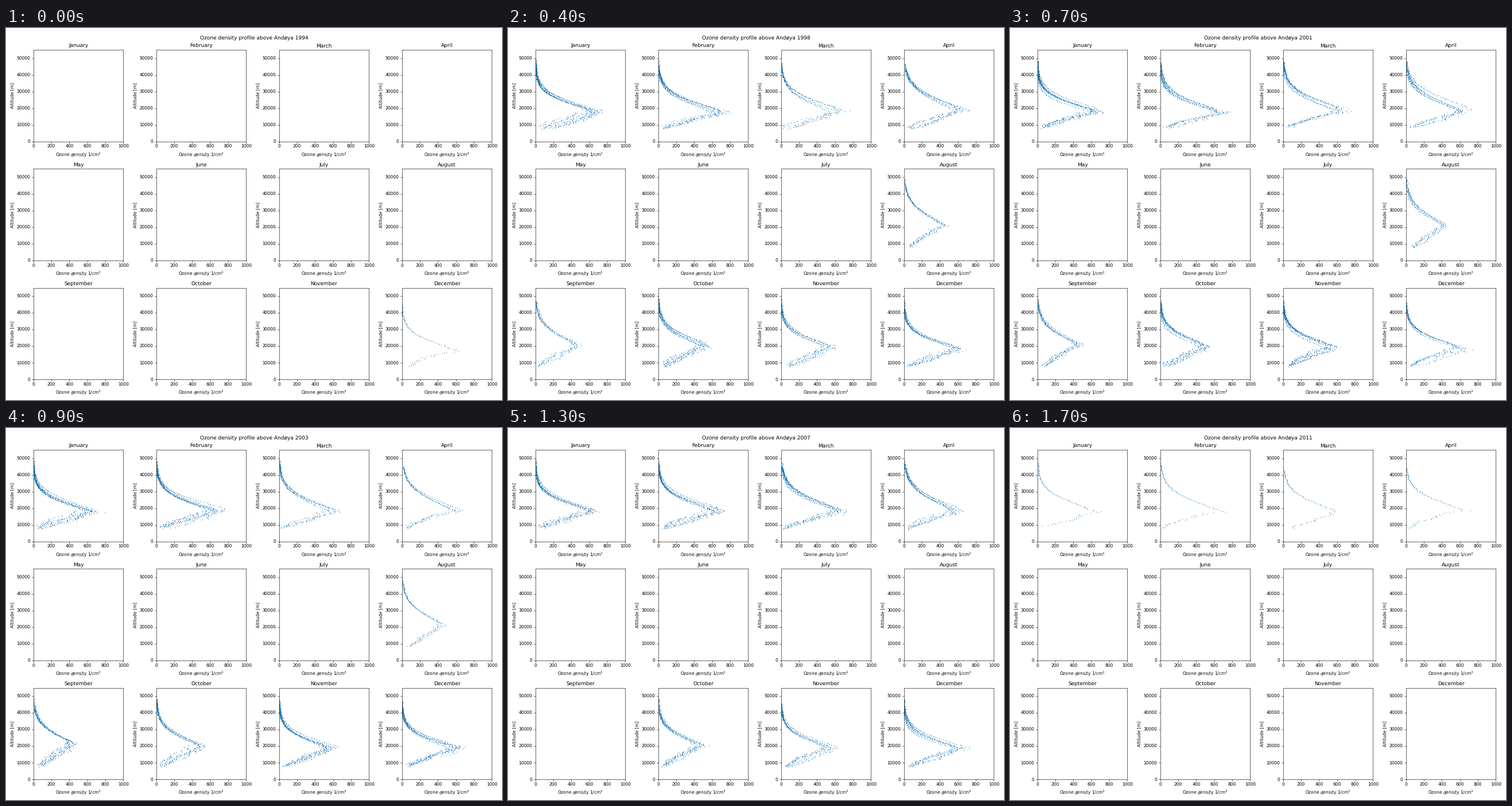
A matplotlib script that plays this animation: 864x648 px, repeating every 1800 ms.

```python
import numpy as np
import matplotlib.pyplot as plt
from matplotlib.animation import FuncAnimation

W, H, DPI = 864, 648, 54
FIRST, LAST = 1994, 2011
MONTHS = ("January February March April May June July August "
          "September October November December").split()
# Months without flights, besides the summer break from May to July.
GAPS = {1996: (1, 2, 4, 9, 10), 1999: (4, 8), 2007: (8, 9)}
POWER = 1.4  # falloff above the density peak


def season(month, warmest):
    return np.cos(2 * np.pi * (month - warmest) / 12)


def has_flights(year, month):
    if year == FIRST:
        return month == 12
    if year == LAST:
        return month <= 4
    return not 5 <= month <= 7 and month not in GAPS.get(year, ())


def flight_count(rng, year, month):
    activity = min(1, (year - FIRST + 1) / 4, (LAST + 1 - year) / 4)
    usual = 5 + 2.5 * season(month, 1) + rng.uniform(-1.5, 1.5)
    return max(1, int(activity * usual))


def sounding(rng, month):
    """One flight: ragged rise to the density peak, then a smooth decay."""
    winter = season(month, 2)
    peak, peak_km = 550 + 115 * winter, 19.4 - 1.6 * winter
    at30 = 160 - 45 * season(month, 12)
    width = (30 - peak_km) / np.log(peak / at30) ** (1 / POWER)

    peak *= rng.normal(1, 0.06)
    peak_km += rng.normal(0, 0.7)
    width *= rng.normal(1, 0.06)
    low, low_km = rng.uniform(35, 110), rng.uniform(7.5, 9.5)

    z = np.arange(low_km, rng.uniform(42, 49), 0.4)
    t = np.clip((z - low_km) / (peak_km - low_km), 0, 1)
    above = np.maximum(z - peak_km, 0)
    rise = low + (peak - low) * t ** rng.uniform(0.6, 1.7)
    decay = peak * np.exp(-(above / width) ** POWER)
    x = np.where(above > 0, decay, rise)

    # Layers and scatter are strong below the peak and fade above it.
    rough = peak * np.exp(-above / 1.5) * (0.25 + 0.75 * t)
    layers = np.sin(z * rng.uniform(0.8, 1.6) + rng.uniform(0, 6.3))
    x += rough * (0.06 * layers + rng.normal(0, 0.06, z.size))
    x += rng.normal(0, 5, z.size)
    return np.column_stack([np.abs(x), z * 1000])


def month_cloud(year, month):
    if not has_flights(year, month):
        return np.empty((0, 2))
    rng = np.random.default_rng(year * 100 + month)
    count = flight_count(rng, year, month)
    return np.vstack([sounding(rng, month) for _ in range(count)])


clouds = [[month_cloud(year, month) for month in range(1, 13)]
          for year in range(FIRST, LAST + 1)]

plt.rcParams["text.hinting"] = "none"
fig, axes = plt.subplots(3, 4, figsize=(W / DPI, H / DPI), dpi=DPI)
fig.subplots_adjust(left=47.6 / W, right=846.4 / W,
                    top=1 - 38 / H, bottom=1 - 612.4 / H,
                    wspace=0.364, hspace=0.298)
heading = fig.suptitle("")
dots = []
for ax, name in zip(axes.flat, MONTHS):
    ax.set(title=name, xlim=(0, 1000), ylim=(0, 55000),
           xlabel="Ozone density 1/cm$^3$", ylabel="Altitude [m]")
    dots.append(ax.scatter([], [], s=1, lw=0.6, color="C0"))


def update(frame):
    heading.set_text(f"Ozone density profile above Andøya {FIRST + frame}")
    for dot, cloud in zip(dots, clouds[frame]):
        dot.set_offsets(cloud)
    return [heading, *dots]


anim = FuncAnimation(fig, update, frames=len(clouds), interval=100)
plt.show()
```
